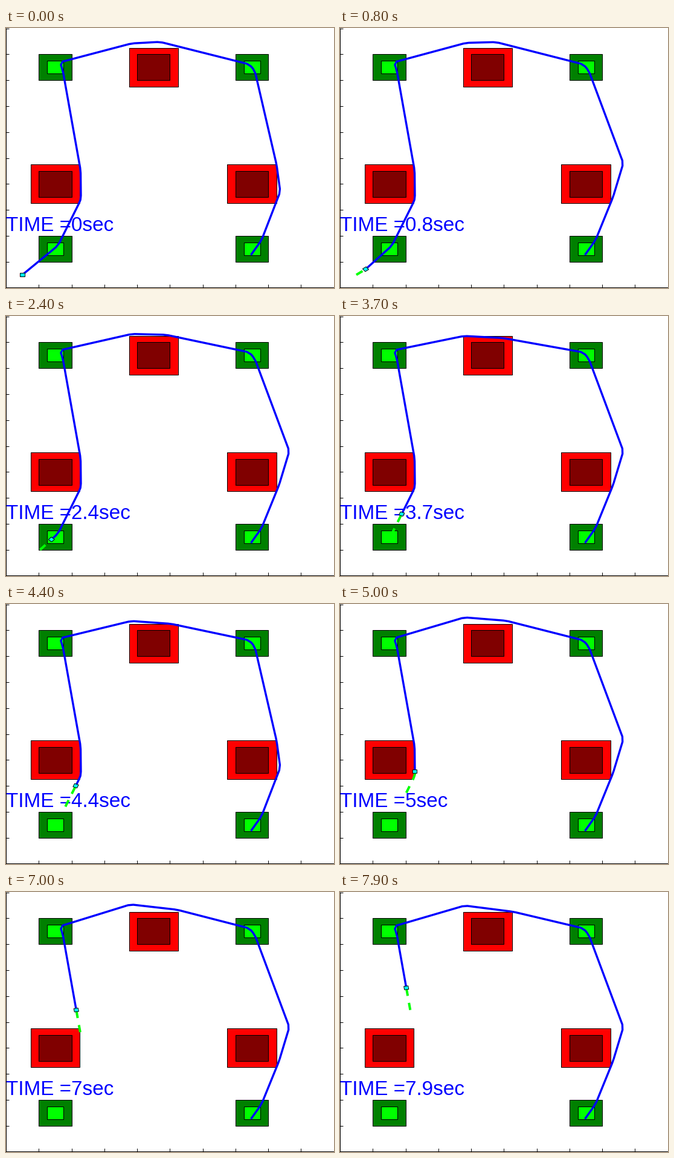
A matplotlib script for the animation above (8 s loop, 543x429 px).

```python
import random

import numpy as np
import matplotlib.pyplot as plt
from matplotlib.animation import FuncAnimation
from matplotlib.patches import Polygon, Rectangle

W, H, DPI = 543, 429, 100
STEPS, INTERVAL = 80, 100
PX = 72 / DPI  # points per pixel
UNIT = np.array([54.25, 42.8])  # pixels per world unit

fig = plt.figure(figsize=((W + 0.01) / DPI, (H + 0.01) / DPI), dpi=DPI, facecolor="white")
ax = fig.add_axes([0, 0, 1, 1])
ax.set_xlim(0, W)
ax.set_ylim(H, 0)
ax.axis("off")


def to_px(u, v):
    return 0.2 + UNIT[0] * u, 428.6 - UNIT[1] * v


def box(cx, cy, w, h, color):
    x, y = to_px(cx - w / 2, cy + h / 2)
    ax.add_patch(Rectangle((x, y), w * UNIT[0], h * UNIT[1],
                           fc=color, ec="black", lw=PX, zorder=1))


def rule(xs, ys):
    ax.plot(xs, ys, color="black", lw=PX, solid_capstyle="butt", zorder=1)


# Axis lines and ticks
rule([0, 0], [0, H])
rule([0, W], [428, 428])
for i in range(11):
    tx, ty = to_px(i, i)
    rule([tx, tx], [428, 423])
    rule([0, 5], [ty, ty])

# Goals and obstacles
for cx, cy in [(1.5, 8.5), (7.5, 8.5), (1.5, 1.5), (7.5, 1.5)]:
    box(cx, cy, 1, 1, "#008000")
    box(cx, cy, 0.5, 0.5, "#00ff00")
for cx, cy in [(4.5, 8.5), (1.5, 4), (7.5, 4)]:
    box(cx, cy, 1.5, 1.5, "#ff0000")
    box(cx, cy, 1, 1, "#800000")

# The robot's way past the first goal and obstacle, measured in world units
ROUTE = np.array([(27, 407.3), (44, 397), (86, 359), (122, 287),
                  (124, 281), (123.5, 235), (94, 70)])
REACH = np.append(0, np.cumsum(np.hypot(*(np.diff(ROUTE, axis=0) / UNIT).T)))
T_GOAL, D_GOAL, CRUISE = 2.8, 1.52, 0.96


def travelled(t):
    """Slow, gently rising speed up to the first goal, then a steady cruise."""
    easing = D_GOAL * (np.minimum(t, T_GOAL) / T_GOAL) ** 1.15
    return easing + CRUISE * np.maximum(t - T_GOAL, 0)


def robot(t):
    d = travelled(t)
    return np.array([np.interp(d, REACH, ROUTE[:, k]) for k in (0, 1)])


def round_corners(points, r=4.5):
    """Cut each inner corner r pixels before and after it."""
    p = np.array(points, float)
    out = [p[0]]
    for a, b, c in zip(p, p[1:], p[2:]):
        for q in (a, c):
            v = q - b
            out.append(b + v * min(r / max(np.hypot(*v), 1e-6), 0.4))
    return np.array(out + [p[-1]])


def plan(step):
    """Replanned way from the robot to the last goal."""
    t = step / 10
    rng = random.Random(step)
    ahead = ROUTE[2:][REACH[2:] > travelled(t) + 0.03]

    # The arch over the top obstacle dips, then lifts clear and tilts
    u = (t - 4.75) / 1.8
    crest = 24.7 - 19 * u * np.exp(-u * u) + rng.uniform(-1, 1)
    arch = [(207 + rng.uniform(-2, 2), crest), (255 + 4 * t, crest + 1.6 * t - 2.5)]

    # The way past the right obstacle hops between a tight and a wide one
    tight = (step + 4) % 15 < 5
    side = [(448, 226), (454, 270)] if tight else [(469, 223), (452, 279)]

    return round_corners([robot(t), *ahead, (89.5, 56.5), *arch, (403, 60), (412, 71),
                          *side, (423, 350), (405.5, 374.5)])


way, = ax.plot([], [], color="#0000ff", lw=3.4 * PX, zorder=3,
               solid_joinstyle="round", solid_capstyle="butt")
trail, = ax.plot([], [], color="#00ff00", lw=4 * PX, zorder=4,
                 dashes=(12 / 4, 11.7 / 4), dash_capstyle="butt")
label = ax.text(0, 335, "", color="#0000ff", family="Liberation Sans",
                size=33.3 * PX, ha="left", va="baseline", zorder=3)
body = Polygon([(0, 0)] * 4, fc="#00ffff", ec="black", lw=PX, zorder=5)
ax.add_patch(body)
CORNERS = 0.066 * np.array([(-1, -1), (1, -1), (1, 1), (-1, 1)])


def update(step):
    t = step / 10
    way.set_data(*plan(step).T)
    trail.set_data(*robot(np.linspace(max(t - 0.9, 0), t, 10)))

    # The body turns in world units, so it shears on screen
    pos = robot(t)
    dx, dy = (pos - robot(max(t - 0.1, 0))) / UNIT
    a = np.arctan2(dy, dx)
    turn = np.array([[np.cos(a), np.sin(a)], [-np.sin(a), np.cos(a)]])
    body.set_xy(pos + CORNERS @ turn * UNIT)

    label.set_text(f"TIME ={t:g}sec")
    return way, trail, label, body


anim = FuncAnimation(fig, update, frames=STEPS, interval=INTERVAL, repeat=True, repeat_delay=0)
plt.show()
```
